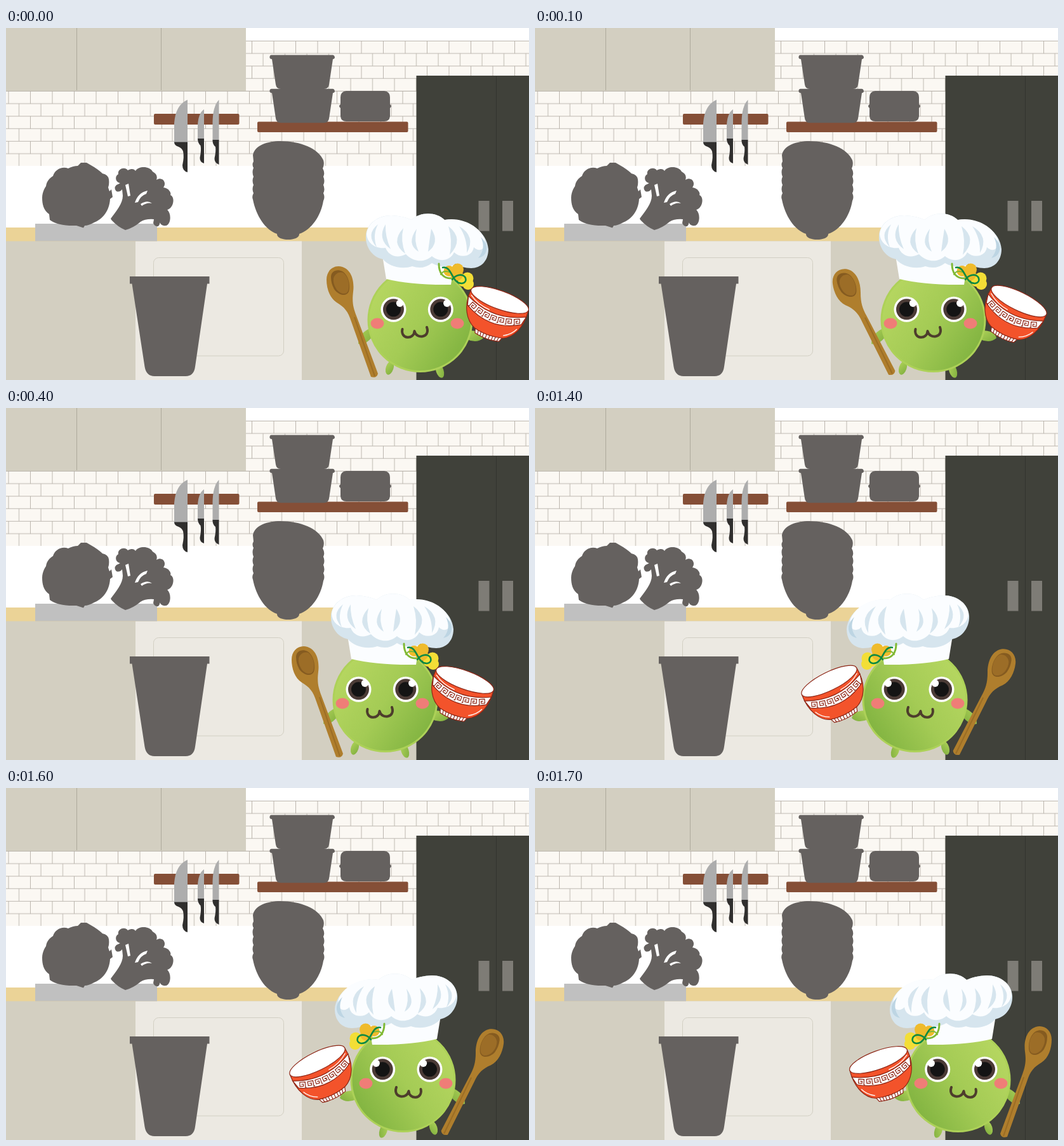
These frames come from a looping animation (824x554 px, 2.2 s). An HTML page:

```html
<!DOCTYPE html>
<html lang="en">
<head>
<meta charset="utf-8">
<title>Kitchen chef</title>
<style>
  html, body { margin: 0; width: 100%; height: 100%; overflow: hidden; background: #fff; }
  svg { display: block; width: 100%; height: 100%; }
</style>
</head>
<body>
<svg viewBox="0 0 824 554">
  <defs>
    <pattern id="tilesLow" x="4.5" y="99" width="34.5" height="39.4" patternUnits="userSpaceOnUse">
      <rect width="35" height="40" fill="#fbf8f3"/>
      <path d="M0 .5H35M0 20H35M34 0V20M16 20V40" stroke="#b5b0a7" stroke-width=".9"/>
    </pattern>
    <pattern id="tilesHigh" x="387" y="20" width="34.5" height="39.4" patternUnits="userSpaceOnUse">
      <rect width="35" height="40" fill="#fbf8f3"/>
      <path d="M0 .5H35M0 20H35M.5 0V20M18 20V40" stroke="#b5b0a7" stroke-width=".9"/>
    </pattern>
    <linearGradient id="skin" x1=".1" y1=".2" x2=".95" y2=".75">
      <stop offset="0" stop-color="#b5d660"/>
      <stop offset=".5" stop-color="#a4cb55"/>
      <stop offset="1" stop-color="#82b441"/>
    </linearGradient>
    <linearGradient id="limb" x1="0" y1="0" x2="1" y2="1">
      <stop offset="0" stop-color="#b0d35a"/>
      <stop offset="1" stop-color="#7fae3e"/>
    </linearGradient>
    <g id="eye">
      <circle r="20" fill="#fff"/>
      <circle r="16.500" fill="#4b3b36"/>
      <circle r="11.500" fill="#141414"/>
      <circle cx="10" cy="-9.500" r="5.700" fill="#fff"/>
    </g>
    <path id="pot" d="M418 42.500H515Q518 43 518 47Q517 49 515 49L509 89Q508 96 501 96H433Q426 96 425 89L419 49Q416 49 415.500 47Q415 43 418 42.500Z"/>
  </defs>

  <!-- walls and furniture -->
  <rect y="99" width="647" height="118" fill="url(#tilesLow)"/>
  <rect x="378" y="20" width="446" height="79" fill="url(#tilesHigh)"/>
  <rect width="378" height="99" fill="#d3cfc1"/>
  <path d="M111.500 0V98M244.500 0V98" stroke="#aaa698" stroke-width=".9"/>
  <rect y="314" width="647" height="22" fill="#ebd397"/>
  <rect y="335.500" width="647" height="219" fill="#d3cfc1"/>
  <rect x="204" y="335.500" width="262" height="219" fill="#ece9e2"/>
  <rect x="232.500" y="361.500" width="205" height="154.500" rx="8" fill="none" stroke="#d2cfc3"/>
  <rect x="646.500" y="75" width="178" height="479" fill="#40413a"/>
  <path d="M772.500 76V554" stroke="#33342e"/>
  <path d="M744.500 272h17v47.500h-17zM782 272h17v47.500h-17z" fill="#7e7c76"/>
  <rect x="46" y="308" width="192" height="27.500" fill="#c0c0c0"/>
  <g fill="#854f37">
    <rect x="233" y="135" width="134.500" height="17" rx="2"/>
    <rect x="396" y="147.500" width="237.500" height="16.500" rx="2"/>
  </g>

  <!-- knives -->
  <g fill="#adadad">
    <path d="M286 113V180H265V150Q267 121 286 113Z"/>
    <path d="M312 128V175H302V153Q303 134 312 128Z"/>
    <path d="M335.500 113V177H325.500V147Q326 123 335.500 113Z"/>
  </g>
  <g fill="#302f2e">
    <path d="M265 179.500H286V227Q278 225 278 216Q281 202 279 194Q277 189 272 187Q265 185 265 179.500Z"/>
    <path d="M302 174H312V213Q305 211 305.500 204Q308 192 306.500 185Q302 181 302 174Z"/>
    <path d="M325.500 176H335.500V215Q328 212 328.500 205Q331 194 330 187Q325 183 325.500 176Z"/>
  </g>

  <!-- silhouettes -->
  <g fill="#65615f">
    <use href="#pot"/>
    <use href="#pot" y="53.300"/>
    <path d="M536 99H596Q605 100 605 109V120Q609 123 605 126V139Q604 147 596 147H536Q528 147 527 139V126Q523 123 527 120V109Q527 100 536 99Z"/>
    <path d="M389 200C392 184 413 178 432 178C465 178 492 190 500 208Q502 215 499 221Q503 228 500 234Q503 241 500 247Q503 254 500 260Q503 266 500 272C496 296 481 318 462 324C463 336 426 336 427 324C409 318 394 296 389 270Q387 265 390 260Q387 253 390 247Q387 240 390 234Q387 227 390 220Q387 215 390 210Z"/>
    <path d="M195 391H320.500V402.500H317L298 533Q296 548 283 548H234Q221 548 218.500 533L198.500 402.500H195Z"/>
    <path d="M69 302L68 293C59 287 57 277 57 267C57 260 60 253 63 249C64 241 69 236 74 233C77 223 88 217 98 221Q106 217 113 217L118 212H127L139 219Q148 225 152 229Q161 231 162 238Q163 246 161 251L163 257L166 254L168 266L164 269C163 288 152 301 139 306Q130 311 124 311L122 314.500L111 311Q82 312 69 302Z"/>
    <path d="M165 300C174 288 184 276 184 264L183 254Q179 259 174 257Q169 252 174 247Q177 246 180 244C172 243 171 233 177 230C175 222 187 217 192 224C199 220 203 223 204 225C209 217 226 217 231 226C237 229 239 234 237 239C246 233 254 243 248 251C256 252 261 259 259 263C267 266 264 284 254 286C261 292 260 309 252 311C245 312 241 307 242 301Q244 308 240 312Q234 313 232 307L233 301Q220 300 212 305Q200 315 188 318Q176 313 166 302Z"/>
  </g>
  <g fill="#fff">
    <path d="M188 247L193 245L196 264L192 265Z"/>
    <path d="M203 275Q208 259 223 256L221 261Q212 264 208 274Z"/>
    <path d="M212 277Q223 270 230 276Q222 274 214 280Z"/>
  </g>

  <g id="chef">
    <g fill="url(#limb)">
      <path d="M577 471Q555 480 555 497Q565 501 578 485Z"/>
      <path d="M728 476Q750 476 752 488Q742 497 726 490Z"/>
      <ellipse cx="604.500" cy="535" rx="6" ry="11" transform="rotate(18 604.500 535)"/>
      <ellipse cx="683.500" cy="539.500" rx="6" ry="11.500" transform="rotate(-18 683.500 539.500)"/>
    </g>
    <ellipse cx="652.500" cy="459.500" rx="81.500" ry="81" fill="url(#skin)" stroke="#add158" stroke-width="3"/>

    <!-- hat -->
    <path d="M592 352L599 395Q640 405 701 404L708 360Z" fill="#fbfdff"/>
    <path d="M594 364C575 360 566 342 567 327C568 308 586 295 607 295Q627 296 639 302C652 289 678 289 691 302C722 297 758 318 760 348C760 367 748 378 733 378Q718 378 709 371C696 378 681 376 671 370Q657 381 640 375C622 381 602 374 594 364Z" fill="#d6e5ee"/>
    <path d="M568 324C570 307 587 295 607 295Q627 296 639 302C652 289 678 289 691 302C716 297 745 310 754 332C758 350 744 353 737 345C735 360 716 363 706 353C699 368 681 368 671 359C658 371 640 367 630 356C615 364 602 357 598 346C581 348 569 338 568 324Z" fill="#fbfdff"/>
    <g fill="#d6e5ee">
      <path d="M586 309Q566 325 584 345Q577 326 586 309Z"/>
      <path d="M598 309Q584 332 606 348Q597 328 598 309Z"/>
      <path d="M626 315Q605 338 629 355Q621 334 626 315Z"/>
      <path d="M647 316Q630 340 650 352Q642 335 647 316Z"/>
      <path d="M670 316Q684 338 665 352Q667 335 670 316Z"/>
      <path d="M697 312Q723 332 699 357Q704 334 697 312Z"/>
      <path d="M714 312Q741 328 726 354Q727 331 714 312Z"/>
    </g>
    <path d="M748 329Q757 347 744 362Q758 359 757 344Q755 335 748 329Z" fill="#bdd5e3"/>

    <!-- flower -->
    <g fill="#f3de36">
      <circle cx="727" cy="394" r="9.500"/>
      <circle cx="728" cy="403" r="9"/>
      <circle cx="720" cy="399" r="8"/>
    </g>
    <g fill="#efbb2c">
      <circle cx="711.500" cy="380" r="9.500"/>
      <circle cx="698" cy="382.500" r="8.500"/>
      <circle cx="710" cy="388" r="10"/>
    </g>
    <g fill="none" stroke-linecap="round">
      <path d="M682 371C682 386 689 394 701 394" stroke="#80b934" stroke-width="3"/>
      <path d="M685 388Q689 381 698 384" stroke="#80b934" stroke-width="2"/>
      <path d="M688 377C703 374 702 402 718 402C729 401 725 386 713 389Q706 391 703 396" stroke="#0d8a42" stroke-width="2.600"/>
    </g>

    <!-- face -->
    <use href="#eye" x="610.500" y="442.800"/>
    <use href="#eye" x="684.800" y="442.800"/>
    <g fill="#ef7d77">
      <ellipse cx="585" cy="465" rx="10.500" ry="8.500"/>
      <ellipse cx="711" cy="465" rx="10.500" ry="8.500"/>
    </g>
    <path d="M624.500 474C621 490 643 491 643.500 477C646 490 669 488 663 471" fill="none" stroke="#4d3d2c" stroke-width="4" stroke-linecap="round" stroke-linejoin="round"/>

    <g id="spoon">
      <path d="M505 396C505 381 517 372 530 376C545 381 549 399 547 415C545 432 547 440 552 453L586 544Q584 552 575 549L544 462C539 446 533 439 521 432C510 425 505 410 505 396Z" fill="#af7e2d"/>
      <path d="M549 455L581 548" stroke="#9b6d25" stroke-width="2"/>
      <path d="M512 392C512 382 522 379 530 383C540 389 543 406 540 415C536 424 523 420 517 411Q512 402 512 392Z" fill="#855b20"/>
      <path d="M516 394C518 386 526 383 531 385C540 391 542 406 539 414C535 422 524 417 520 410Q515 402 516 394Z" fill="#9c6d27"/>
    </g>

    <g id="bowl" stroke="#8d2616" stroke-width="1.200">
      <path d="M-22 52L-19 62Q1 67 21 62L25 52Z" fill="#fff"/>
      <path d="M-16 54l1.500 9M-11 55l1 9M-6 56v8M-1 56v9M4 56v9M9 56v8M14 55l-1 9M19 54l-1.500 9"/>
      <path d="M-48 0C-51 30 -37 49 -22 55Q1 61 25 55C39 49 51 30 48 0Z" fill="#f3532b"/>
      <path d="M-48.500 11Q0 35 48.500 11L45 25Q0 51 -45 25Z" fill="#fff"/>
      <g id="keys" fill="none"></g>
      <path d="M24 51Q36 45 41 34M-45 8Q-30 19 -10 20" fill="none" stroke="#fff"/>
      <ellipse rx="48" ry="14.500" fill="#fff"/>
    </g>
  </g>
</svg>
<script>
  const byId = id => document.getElementById(id);
  const LOOP = 2200, MIRROR = 1319;

  // start time, horizontal shift, facing the other way, swaying
  const steps = [
    [0, 0, false, false],
    [100, -25, false, true],
    [200, -35, false, false],
    [300, -44, false, true],
    [400, -55, false, false],
    [1400, -68, true, true],
    [1500, -54, true, false],
    [1600, -41, true, true],
    [1700, 0, true, false]
  ];

  // meander ornament following the curve of the bowl
  let keys = '';
  for (let i = -3; i <= 3; i++) {
    const x = i * 12.3;
    const y = 30.5 - 12.5 * (x / 48) ** 2;
    const angle = -25 * x / 48 ** 2 * 180 / Math.PI;
    keys += `<path transform="translate(${x} ${y}) rotate(${angle})" d="M-6 4.500H-4V-4H4.500V2.500H-1V-.8H2"/>`;
  }
  byId('keys').innerHTML = keys;

  function draw() {
    const time = performance.now() % LOOP;
    const [, shift, flipped, sway] = steps.findLast(step => step[0] <= time);
    byId('chef').setAttribute('transform',
      flipped ? `translate(${MIRROR + shift}) scale(-1 1)` : `translate(${shift})`);
    byId('spoon').setAttribute('transform', sway ? 'translate(-2) rotate(-7 553 473)' : '');
    byId('bowl').setAttribute('transform',
      sway ? 'translate(787.5 430) rotate(26)' : 'translate(778 428) rotate(20)');
    requestAnimationFrame(draw);
  }
  draw();
</script>
</body>
</html>
```
